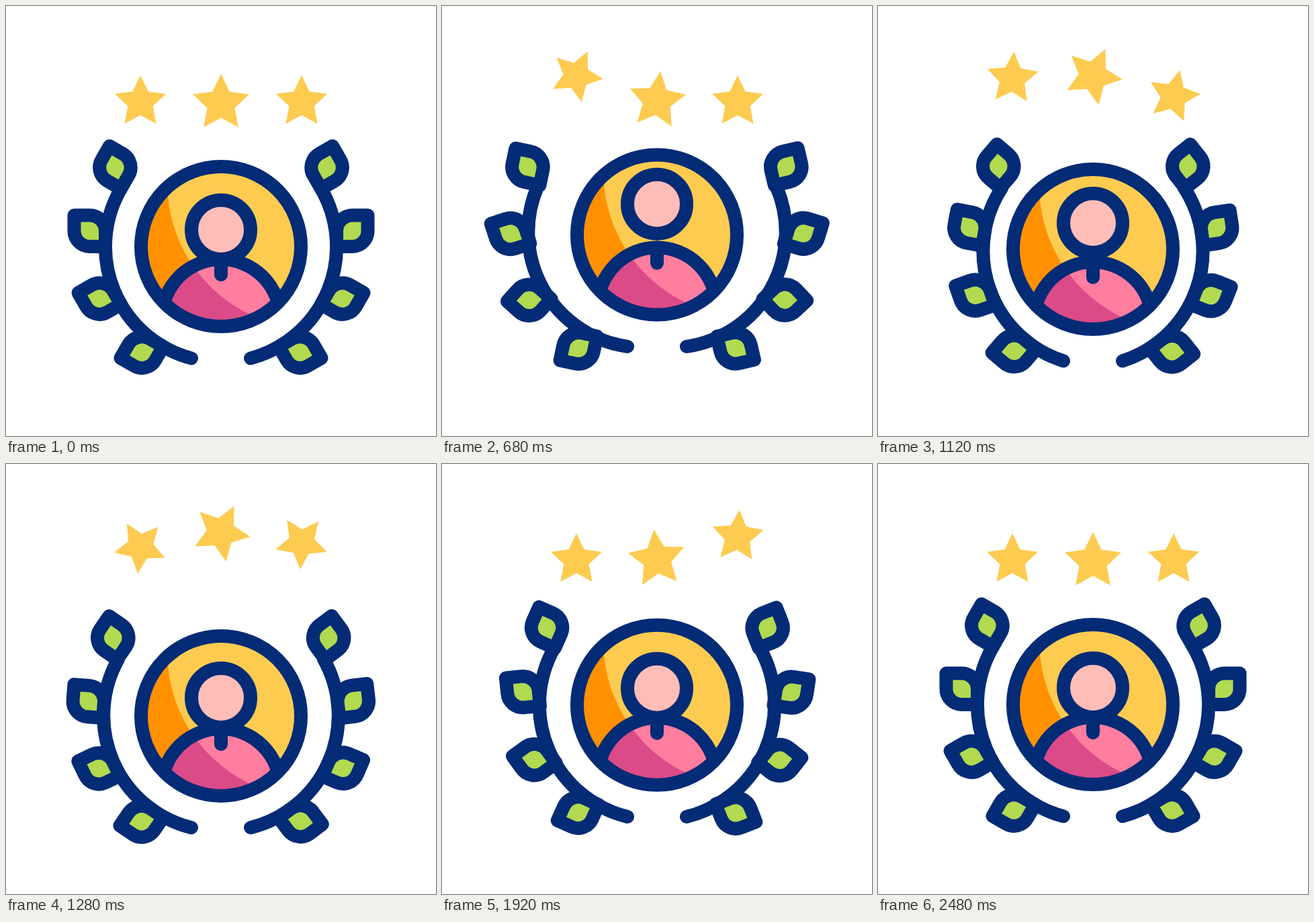
These frames come from a looping animation (640 px wide and 640 px high, 2.52 s). An HTML page:

```html
<!DOCTYPE html>
<html lang="en">
<head>
<meta charset="utf-8">
<title>Top rated profile</title>
<style>
  html, body { margin: 0; width: 100%; height: 100%; overflow: hidden; background: #fff; }
  svg { display: block; width: 100vw; height: 100vh; }
  .line { stroke: #042b76; stroke-width: 20; stroke-linecap: round; stroke-linejoin: round; fill: none; }
  .star { fill: #fdcb50; }
</style>
</head>
<body>
<svg viewBox="0 0 640 640">
  <defs>
    <clipPath id="disc"><circle cx="320" cy="358" r="119"/></clipPath>
    <clipPath id="bust"><circle cx="320" cy="465" r="88"/></clipPath>
  </defs>
  <g id="stars"></g>
  <g id="badge">
    <g id="wings"></g>
    <g clip-path="url(#disc)">
      <rect x="200" y="238" width="240" height="240" fill="#ff9100"/>
      <circle cx="456.8" cy="263.7" r="216.7" fill="#fdcb50"/>
      <g clip-path="url(#bust)">
        <rect x="220" y="370" width="200" height="110" fill="#db4b87"/>
        <circle cx="456.8" cy="263.7" r="216.7" fill="#ff7d9f"/>
      </g>
      <circle class="line" cx="320" cy="465" r="88"/>
    </g>
    <path class="line" d="M320 377V400"/>
    <circle class="line" cx="320" cy="358" r="119"/>
    <circle id="head" class="line" cx="320" cy="333" r="44" style="fill:#ffbdb8"/>
  </g>
</svg>
<script>
const LOOP = 2520, STEP = 40;
const $ = id => document.getElementById(id);

function add(parent, tag, attrs) {
  const el = document.createElementNS('http://www.w3.org/2000/svg', tag);
  for (const k in attrs) el.setAttribute(k, attrs[k]);
  return parent.appendChild(el);
}

const clamp = p => Math.min(1, Math.max(0, p));
const sine = p => (1 - Math.cos(Math.PI * p)) / 2;
const steep = p => p < .5 ? (2 * p) ** 2.7 / 2 : 1 - (2 - 2 * p) ** 2.7 / 2;

// Eased value along [time, value] keys.
function along(keys, t) {
  let v = keys[0][1];
  for (let i = 1; i < keys.length; i++) {
    const [t0, v0] = keys[i - 1], [t1, v1] = keys[i];
    if (t >= t0) v = v0 + (v1 - v0) * sine(clamp((t - t0) / (t1 - t0)));
  }
  return v;
}

const LIFT = [[390, 0], [768, -20], [1392, 20], [1560, 20], [1970, 0]];
const NOD = [[360, 0], [760, -23], [940, -23], [1360, 0]];
const SWAY = [[280, 0], [600, 7], [640, 7], [1000, -4], [1600, 7], [1680, 7], [2000, 0]];
const FLUTTER = [[360, 0], [680, 11.5], [1160, -8], [1660, 11.5], [2140, 0]];

// Stars: one full turn and one hop around the time "mid".
function starPath(R, r) {
  let d = '';
  for (let i = 0; i < 10; i++) {
    const a = i * Math.PI / 5, q = i % 2 ? r : R;
    d += (i ? 'L' : 'M') + (q * Math.sin(a)).toFixed(2) + ' ' + (-q * Math.cos(a)).toFixed(2);
  }
  return d + 'Z';
}
const stars = [
  { x: 200, y: 143, R: 40, hop: 41, mid: 859 },
  { x: 320, y: 145, R: 44, hop: 43, mid: 1298 },
  { x: 440, y: 143, R: 40, hop: 41, mid: 1657 }
];
for (const s of stars) s.el = add($('stars'), 'path', { class: 'star', d: starPath(s.R, s.R * .49) });

function drawStar(s, t) {
  const turn = 360 * steep(clamp((t - s.mid) / 1740 + .5));
  const up = s.hop * steep(clamp(1 - Math.abs(t - s.mid + 5) / 840));
  s.el.setAttribute('transform', `translate(${s.x} ${s.y - up}) rotate(${turn})`);
}

// Laurel: the right branch mirrors the left one, its leaves trail a little.
const LEAF = 'M0 0H-23.5A23 23 0 0 1 -46.5 -23.5V-46.5H-23.5A23.5 23.5 0 0 1 0 -23Z';
const wings = [0, 70].map((lag, i) => {
  const side = add($('wings'), 'g', i ? { transform: 'translate(640 0) scale(-1 1)' } : {});
  const branch = add(side, 'g', {});
  add(branch, 'path', { class: 'line', d: 'M276 524.3A172 172 0 0 1 171 272' });
  const leaves = [30, 0, -30, -60].map(deg => {
    const a = deg * Math.PI / 180;
    return {
      deg, x: 320 - 172 * Math.cos(a), y: 358 - 172 * Math.sin(a),
      el: add(branch, 'path', { class: 'line', d: LEAF, style: 'fill:#b1da50' })
    };
  });
  return { lag, branch, leaves };
});

function drawWing(w, t) {
  w.branch.setAttribute('transform', `rotate(${-along(SWAY, t)} 276 524.3)`);
  const flap = along(FLUTTER, t - w.lag);
  for (const l of w.leaves)
    l.el.setAttribute('transform', `translate(${l.x} ${l.y}) rotate(${l.deg}) rotate(${-flap} -12 -12)`);
}

function draw(t) {
  stars.forEach(s => drawStar(s, t));
  wings.forEach(w => drawWing(w, t));
  $('badge').setAttribute('transform', `translate(0 ${along(LIFT, t)})`);
  $('head').setAttribute('transform', `translate(0 ${along(NOD, t)})`);
}

let start;
function tick(now) {
  if (start === undefined) start = now;
  const t = Math.max(0, now - start) % LOOP;
  draw(Math.floor(t / STEP) * STEP);
  requestAnimationFrame(tick);
}
draw(0);
requestAnimationFrame(tick);
</script>
</body>
</html>
```
